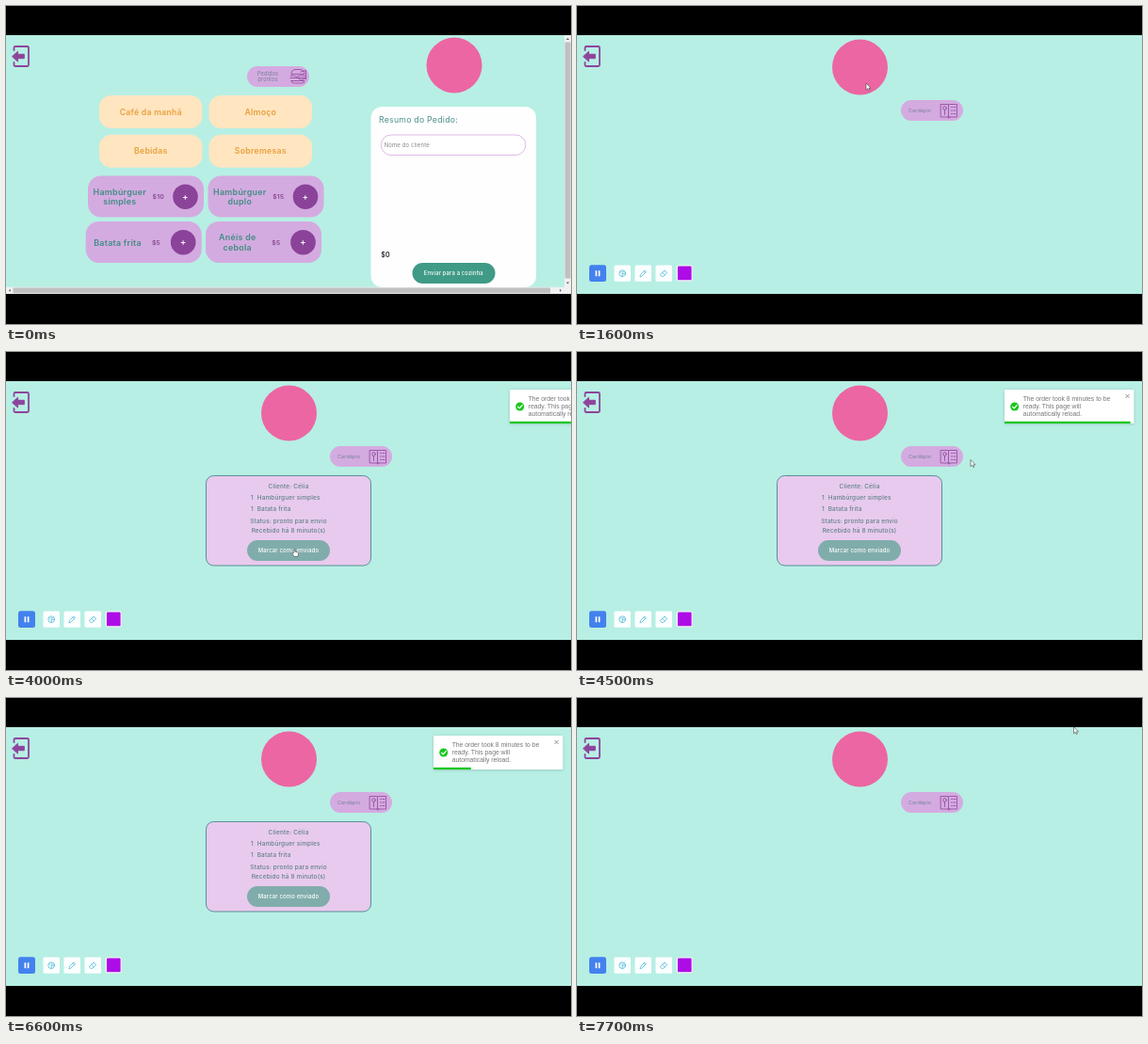
Recreate the animation shown at these times as an HTML page. Size 600 px wide and 338 px high, loop 8700 ms.

```html
<!DOCTYPE html>
<html lang="pt">
<head>
<meta charset="utf-8">
<title>Pedidos</title>
<style>
  html, body { margin: 0; width: 100%; height: 100%; overflow: hidden; background: #000; }
  svg { display: block; width: 100vw; height: 100vh; }
  text { font-family: Inter, sans-serif; font-weight: 500; letter-spacing: .03em; text-anchor: middle; }
  .left { text-anchor: start; }
  .bold { font-weight: 600; }
  .thin { font-weight: 400; }
  .line { fill: none; stroke-linecap: round; stroke-linejoin: round; }
  .toast { font: 6.8px "Liberation Sans", Arial, sans-serif; letter-spacing: 0; fill: #777; }
</style>
</head>
<body>
<svg viewBox="0 0 600 338" preserveAspectRatio="none">
  <defs>
    <clipPath id="screen"><rect y="30.5" width="600" height="275.5"/></clipPath>
    <filter id="shadow" x="-10%" y="-20%" width="120%" height="150%">
      <feDropShadow dx="0" dy="0.6" stdDeviation="1.6" flood-opacity=".2"/>
    </filter>
  </defs>
  <rect width="600" height="338"/>
  <g clip-path="url(#screen)">
    <rect y="31" width="600" height="275" fill="#b7efe4"/>
    <g stroke="#8e449c" class="line">
      <path d="M8.5 47V44.5Q8.5 43 10 43H22.5Q24 43 24 44.5V62.5Q24 64 22.5 64H10Q8.5 64 8.5 62.5V60" stroke-width="1.8"/>
      <path d="M6.8 53.5L12.500 48.300V51.300H19.300V55.700H12.500V58.700Z" fill="#8e449c"/>
    </g>

    <g id="menuPage">
      <circle cx="476" cy="63" r="29.5" fill="#ec66a3"/>
      <rect x="256" y="64" width="66" height="22" rx="11" fill="#d4abe0"/>
      <g font-size="5.5" fill="#718295">
        <text class="thin" x="278" y="74">Pedidos</text>
        <text class="thin" x="278" y="80.3">prontos</text>
      </g>
      <g class="line" stroke="#8e449c" stroke-width=".8">
        <path d="M303 72Q303 67.5 308 67.5H312Q317 67.5 317 72ZM302 74.5Q304 73 306.5 74.5T311 74.5T318 74.5"/>
        <path d="M302 76.5H318L314 79L310 76.5M303 79.5H317Q317 82 314.5 82H305.5Q303 82 303 79.5M313 70L318.5 68.5V78"/>
      </g>
      <g id="categories"></g>
      <g id="products"></g>

      <rect x="387.5" y="107" width="175.5" height="192" rx="12" fill="#fefefe"/>
      <text class="left thin" x="396" y="124.2" font-size="8.7" fill="#4b8f8b">Resumo do Pedido:</text>
      <rect x="398.3" y="137" width="153.5" height="21.5" rx="10.7" fill="#fff" stroke="#dbb0e6" stroke-width=".9"/>
      <text class="left thin" x="401.7" y="150" font-size="5.9" fill="#858585">Nome do cliente</text>
      <text class="left bold" x="398.3" y="267" font-size="7" fill="#222">$0</text>
      <rect x="431.5" y="273" width="88" height="22" rx="11" fill="#3f9a86"/>
      <text x="475.3" y="286.3" font-size="5.8" fill="#fff">Enviar para a cozinha</text>

      <path d="M593 31H600V306H0V298.7H593Z" fill="#f0f0f0"/>
      <path d="M593.5 38.5H599.5V289.5H593.5ZM7.5 299.5H578V305.3H7.5Z" fill="#c0c0c0"/>
      <path d="M594.8 36L596.5 34L598.2 36ZM594.8 293.5L596.5 295.5L598.2 293.5ZM4.800 300.7L3 302.3L4.8 304ZM588 300.7L589.8 302.3L588 304Z" fill="#666"/>
    </g>

    <g id="ordersPage">
      <circle cx="300.5" cy="65" r="29.5" fill="#ec66a3"/>
      <rect x="344" y="100" width="66" height="22" rx="11" fill="#d4abe0"/>
      <text class="thin" x="364.2" y="113.2" font-size="5.4" fill="#718295">Cardápio</text>
      <g class="line" stroke="#8e449c" stroke-width=".8">
        <path d="M386.5 104.5H394.5V118H386.5ZM395.5 104.5H403.5V118H395.5M394 118L395 119.3L396 118"/>
        <path d="M390.5 110.5V115.5M397.5 107.5H398.5M400 107.5H402M397.5 111H398.5M400 111H402M397.5 114.5H398.5M400 114.5H402"/>
        <ellipse cx="390.5" cy="108.5" rx="1.7" ry="2"/>
      </g>
      <g id="order" font-size="6.4" fill="#5f8088">
        <rect x="212.5" y="131.5" width="175" height="95.5" rx="8" fill="#e8caee" stroke="#588f98"/>
        <text x="300" y="144.7">Cliente: Célia</text>
        <text class="left" x="260" y="157">1</text>
        <text class="left" x="266.7" y="157">Hambúrguer simples</text>
        <text class="left" x="260" y="169.4">1</text>
        <text class="left" x="266.7" y="169.4">Batata frita</text>
        <text x="300" y="181.7">Status: pronto para envio</text>
        <text x="300" y="192">Recebido há 8 minuto(s)</text>
        <rect id="sendButton" x="256" y="200" width="88" height="22" rx="11"/>
        <text x="300" y="213.3" font-size="5.9" fill="#fff">Marcar como enviado</text>
      </g>
      <g id="toast">
        <rect x="454" y="40" width="137.3" height="36" rx="1" fill="#fff" filter="url(#shadow)"/>
        <circle cx="464.7" cy="58" r="4.5" fill="#16c81b"/>
        <path d="M462.5 58.2L464.2 59.9L467.2 56.5" class="line" stroke="#fff" stroke-width="1.2"/>
        <text class="toast left" x="473.7" y="52.2">The order took 8 minutes to be</text>
        <text class="toast left" x="473.7" y="60.2">ready. This page will</text>
        <text class="toast left" x="473.7" y="68.2">automatically reload.</text>
        <path d="M582.5 45L586.5 49M586.5 45L582.5 49" stroke="#888" stroke-width=".9"/>
        <rect id="progress" x="454" y="73.8" height="2.2" fill="#16c81b"/>
      </g>
    </g>

    <g id="toolbar">
      <rect x="13" y="275.3" width="18" height="17.7" rx="2.5" fill="#4381ee"/>
      <path d="M20.4 281.300V287.300M23.600 281.300V287.300" stroke="#fff" stroke-width="1.7"/>
      <g fill="#fcffff">
        <rect x="39.5" y="275.5" width="17.5" height="17.2" rx="1.5"/>
        <rect x="61.5" y="275.5" width="17.5" height="17.2" rx="1.5"/>
        <rect x="83.5" y="275.5" width="17.5" height="17.2" rx="1.5"/>
      </g>
      <g class="line" stroke="#4db9d8" stroke-width=".8">
        <circle cx="48.2" cy="284.2" r="3.4"/>
        <path d="M48.2 284.2H51.5M48.2 284.2V287.3M46.3 283H47M48.5 282.5H49.2"/>
        <path d="M67 287.5L67.5 285.5L71.8 281L73.5 282.7L69 287ZM70.8 282.1L72.4 283.7"/>
        <path d="M88.5 285.5L93 281L95.8 283.5L91.5 287.5H90.5ZM90.7 283.3L93.3 285.8"/>
      </g>
      <rect x="106.3" y="276" width="15.900" height="15.900" rx="1.5" fill="#ad0ce6" stroke="#fbf3fd" stroke-width="1.2"/>
    </g>

    <g id="cursor" stroke="#444" stroke-width=".6" fill="#fff" stroke-linejoin="round">
      <path id="arrow" d="M0 0V7.2L1.7 5.7L2.8 8.1L3.9 7.6L2.8 5.3H5Z"/>
      <path id="hand" d="M-.7 .7Q0 -.4 .7 .7V3.2L3.8 4Q4.7 4.3 4.5 5.3L3.9 8.5H.3L-1.9 5.5Q-2 4.3 -.7 5Z"/>
    </g>
  </g>
</svg>
<script>
const LOOP = 8700, STEP = 100;
const el = id => document.getElementById(id);
const show = (id, on) => el(id).setAttribute('display', on ? 'inline' : 'none');
const move = (id, x, y) => el(id).setAttribute('transform', `translate(${x} ${y})`);

const label = (text, x, y, size, fill) =>
  `<text class="bold" x="${x}" y="${y}" font-size="${size}" fill="${fill}">${text}</text>`;

el('categories').innerHTML = ['Café da manhã', 'Almoço', 'Bebidas', 'Sobremesas'].map((name, i) => {
  const x = 99 + i % 2 * 116.5, y = 95 + (i >> 1) * 41.7;
  return `<rect x="${x}" y="${y}" width="109.5" height="35" rx="13" fill="#ffe5c0"/>`
    + label(name, x + 54.8, y + 20.7, 8.7, '#e7a03d');
}).join('');

el('products').innerHTML = [
  [87, 180.5, ['Hambúrguer', 'simples'], '$10'],
  [214.5, 180.5, ['Hambúrguer', 'duplo'], '$15'],
  [84.7, 229, ['Batata frita'], '$5'],
  [212, 229, ['Anéis de', 'cebola'], '$5']
].map(([x, y, lines, price]) =>
  `<rect x="${x}" y="${y}" width="123" height="44" rx="14" fill="#d4abe0"/>`
  + lines.map((s, i) => label(s, x + 33.8, y + 25.5 + (i - (lines.length - 1) / 2) * 10.8, 8.9, '#408d84')).join('')
  + label(price, x + 74.8, y + 24.8, 6.8, '#82468f')
  + `<circle cx="${x + 103.5}" cy="${y + 22.2}" r="13.3" fill="#8b4299"/>`
  + label('+', x + 103.5, y + 25.4, 9.2, '#fff')
).join('');

// Linear interpolation over rows of [time, ...values]
function track(rows, t) {
  const i = rows.findIndex(row => row[0] > t);
  if (i < 0) return rows[rows.length - 1].slice(1);
  if (i === 0) return rows[0].slice(1);
  const a = rows[i - 1], b = rows[i], k = (t - a[0]) / (b[0] - a[0]);
  return a.slice(1).map((v, j) => v + (b[j + 1] - v) * k);
}

const pointer = [
  [300, 430, 298], [700, 345, 150], [900, 345, 150], [1200, 307, 82], [2600, 307, 82],
  [3300, 306, 209], [4200, 306, 209], [4800, 530, 20], [7200, 534, 20], [7700, 527.5, 30.5]
];
const toastSlide = [[3900, 600], [4000, 81], [4100, -11], [4200, 4], [4300, -2], [4400, 0]];

function draw(t) {
  const orders = t >= 1600;
  show('menuPage', !orders);
  show('ordersPage', orders);
  show('order', t >= 2000 && t < 7100);
  el('sendButton').setAttribute('fill', t < 4000 ? '#3f9a86' : '#80adab');

  show('toast', t >= 4000 && t < 7100);
  move('toast', track(toastSlide, t)[0], 0);
  const left = Math.min(1, Math.max(0, 1 - (t - 4420) / 3070));
  el('progress').setAttribute('width', 137.3 * left);

  // The horizontal scrollbar pushes the toolbar up
  show('toolbar', t >= 200);
  move('toolbar', 0, orders ? 0 : -7.6);

  const [x, y] = track(pointer, t);
  const hand = (t >= 1100 && t < 1600) || (orders && x < 340 && y >= 198);
  show('cursor', t >= 400);
  move('cursor', x, y);
  show('hand', hand);
  show('arrow', !hand);
}

const start = performance.now();
function tick() {
  const t = (performance.now() - start) % LOOP;
  draw(Math.floor(t / STEP) * STEP);
  requestAnimationFrame(tick);
}
tick();
</script>
</body>
</html>
```
